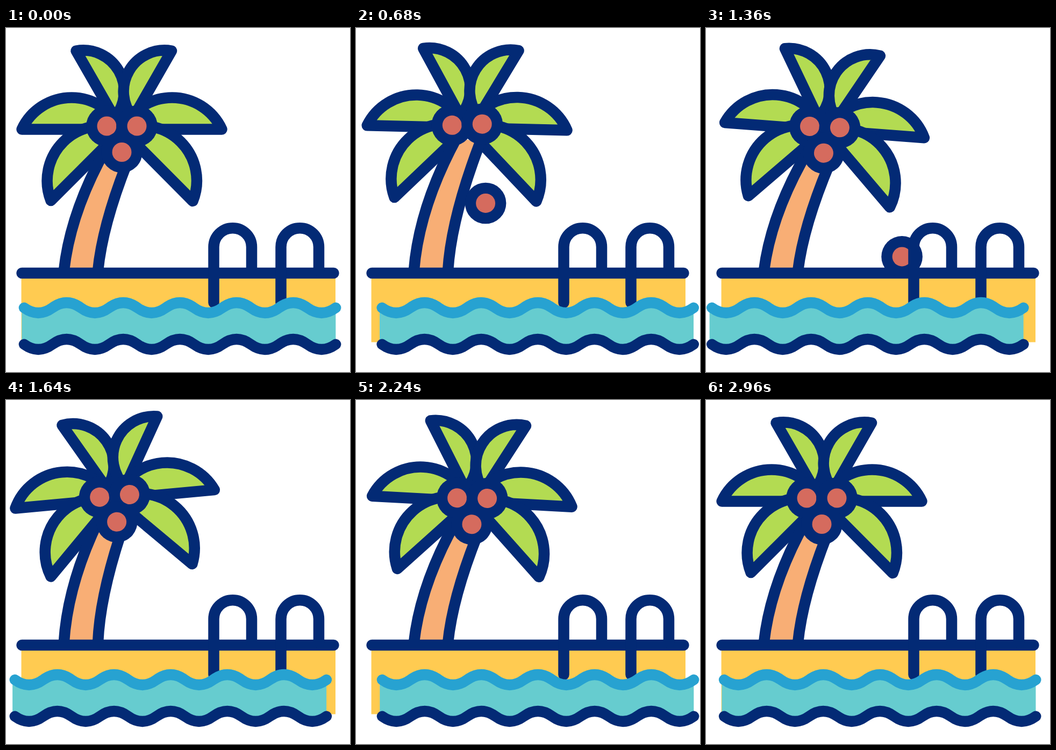
An HTML page that plays this animation: 640 px wide and 640 px high, repeating every 3000 ms.

```html
<!DOCTYPE html>
<html lang="en">
<head>
<meta charset="utf-8">
<title>Palm by the pool</title>
<style>
  html, body { margin: 0; height: 100%; overflow: hidden; background: #fff; }
  svg { display: block; width: 100vw; height: 100vh; }
  .line { fill: none; stroke: #032a75; stroke-width: 20.5; stroke-linecap: round; stroke-linejoin: round; }
  .leaf { fill: #b3db52; }
  .navy { fill: #032a75; }
  .nut { fill: #d56b5e; }
</style>
</head>
<body>
<svg viewBox="0 0 640 640">
  <defs>
    <clipPath id="above"><rect width="640" height="585"/></clipPath>
    <g id="coconut"><circle class="navy" r="38.3"/><circle class="nut" r="18"/></g>
    <path id="rail" class="line" d="M386.5 511V407.5a35 35 0 0 1 70.5 0V452"/>
  </defs>

  <rect x="28.5" y="456" width="584.5" height="128.5" fill="#ffcb51"/>

  <g id="leaves" class="line">
    <path class="leaf" d="M130.5 42.5A76.4 76.4 0 0 1 202 167Z"/>
    <path class="leaf" d="M308 42.5A76.4 76.4 0 0 0 236.6 167Z"/>
    <path class="leaf" d="M29.5 188.5A102 102 0 0 1 214.5 188.5Z"/>
    <path class="leaf" d="M401.5 188.5A102 102 0 0 0 216.5 188.5Z"/>
    <path class="leaf" d="M83.5 321A102 102 0 0 1 215.5 189Z"/>
    <path class="leaf" d="M347.5 322A102 102 0 0 0 215.5 189Z"/>
    <circle class="navy" cx="215.5" cy="172" r="22" stroke="none"/>
  </g>
  <path id="bark" fill="#f8ae75"/>
  <path id="trunk" class="line"/>
  <g id="crown">
    <use href="#coconut" x="187.5" y="182.5"/>
    <use href="#coconut" x="243.5" y="182.5"/>
    <use id="lowNut" href="#coconut"/>
  </g>

  <path class="line" d="M29.5 456H609.5"/>
  <g clip-path="url(#above)"><use id="fallen" href="#coconut"/></g>
  <use href="#rail"/>
  <use href="#rail" x="125"/>

  <g id="water">
    <path id="pool" fill="#66cccf"/>
    <path id="surface" class="line" style="stroke: #27a2d1; stroke-width: 20"/>
    <path id="floor" class="line" style="stroke-width: 20"/>
  </g>
</svg>
<script>
const LOOP = 3000, STEP = 40;
const DROP = 440, LAND = 773, HOP = 1113, SUNK = 1570;
const el = id => document.getElementById(id);
const set = (id, name, value) => el(id).setAttribute(name, value);

// [time, value] keys, joined with sine easing
const drift = [[0, 0], [750, 15], [1420, -23.5], [2250, 15], [3000, 0]];
const sway = [[0, 0], [340, 23.5], [850, -19.5], [1240, 11], [1620, -13.6], [1960, 8], [2300, 0], [3000, 0]];
const flutter = [[0, 0], [450, 12], [920, -10], [1300, 5], [1680, -5.6], [2080, 4.5], [2500, 0], [3000, 0]];

function ease(keys, t) {
  const i = keys.findIndex(k => k[0] > t);
  const [t0, a] = keys[i - 1], [t1, b] = keys[i];
  return a + (b - a) * (1 - Math.cos(Math.PI * (t - t0) / (t1 - t0))) / 2;
}

// Eleven half waves, starting with a trough; dir is 1 rightwards, -1 leftwards
const wave = dir => `q${26.35 * dir} 19 ${52.7 * dir} 0` + `t${52.7 * dir} 0`.repeat(10);

set('surface', 'd', 'M33.7 520.5' + wave(1));
set('floor', 'd', 'M33.7 588.5' + wave(1));
set('pool', 'd', `M29.3 520.5H33.7${wave(1)}V588.5${wave(-1)}H29.3Z`);

function fallenAt(t) {
  if (t < LAND) return [228.5 + (t - DROP) * .0525, 237 + (t - DROP) ** 2 * .001545];
  const x = 246 + (t - LAND) * .202;
  const s = t < HOP ? t - LAND : t - HOP;
  return [x, 408 - (t < HOP ? .51 : .3) * s + .0015 * s * s];
}

function draw(t) {
  const dx = ease(sway, t), dy = dx * .31, turn = ease(flutter, t);
  const move = `translate(${dx} ${dy})`;
  set('water', 'transform', `translate(${ease(drift, t)} 0)`);
  set('leaves', 'transform', `${move} rotate(${turn} 215.5 183)`);
  set('crown', 'transform', `${move} rotate(${.28 * dx + .2 * turn} 215.5 183)`);

  const at = (x, y, k) => `${x + dx * k} ${y + dy * k}`;
  const left = `M107.7 452Q${at(120.5, 335, .4)} ${at(196, 207, 1)}`;
  const right = [at(240, 215, 1), at(180.5, 355, .4)];
  set('trunk', 'd', `${left}M${right[0]}Q${right[1]} 171 452`);
  set('bark', 'd', `${left}L${right[0]}Q${right[1]} 171 452Z`);

  const falling = t >= DROP && t < SUNK;
  const grown = t < DROP ? 1 : Math.sin(Math.PI / 2 * Math.min(1, Math.max(0, (t - 800) / 200)));
  set('lowNut', 'transform', `translate(215.5 231) scale(${grown})`);
  set('fallen', 'visibility', falling ? 'visible' : 'hidden');
  if (falling) set('fallen', 'transform', `translate(${fallenAt(t)})`);
}

const start = performance.now();
function tick() {
  const t = (performance.now() - start) % LOOP;
  draw(Math.floor(t / STEP) * STEP);
  requestAnimationFrame(tick);
}
tick();
</script>
</body>
</html>
```
